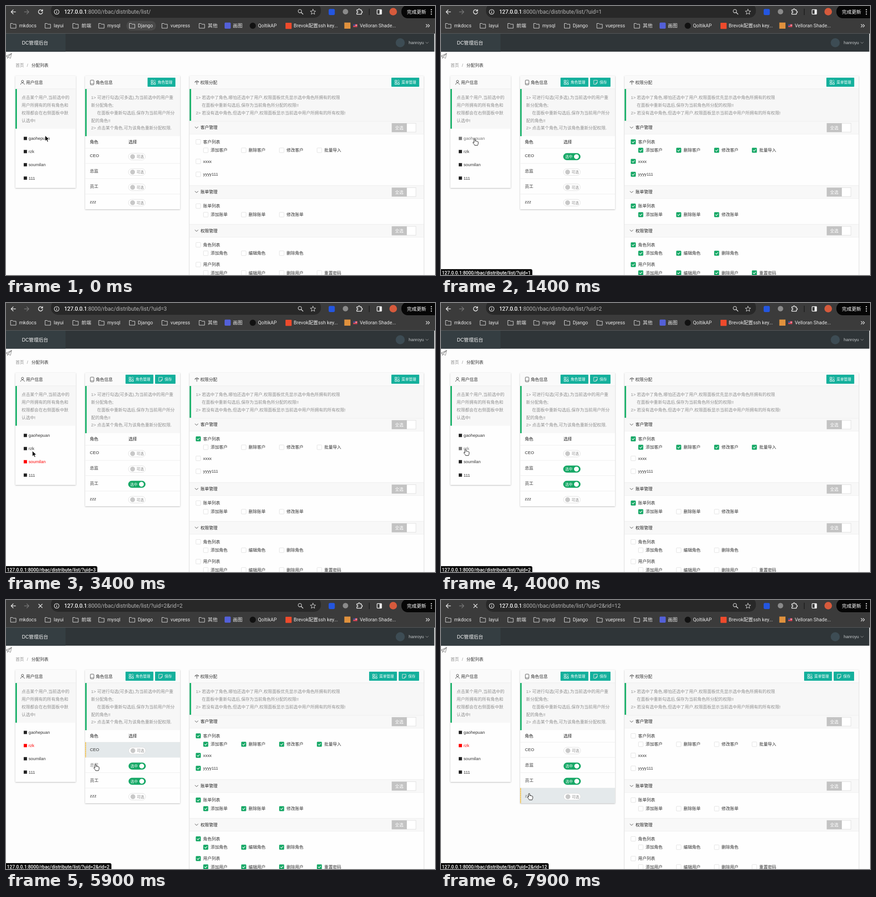
Write an HTML page that moves like this. It is 944 px wide and 593 px high and loops after 8 s.

```html
<!DOCTYPE html>
<html lang="zh-CN">
<head>
<meta charset="utf-8">
<title>分配列表</title>
<style>
html, body { margin: 0; width: 100%; height: 100%; overflow: hidden; background: #fdfdfd; }
svg { position: absolute; left: 0; top: 0; display: block; }
text { font: 9.35px "Liberation Sans", "Noto Sans CJK SC", "Noto Sans CJK", sans-serif; fill: #333; white-space: pre; }
.bar { font: 10.7px Roboto, "Noto Sans CJK SC", "Noto Sans CJK", sans-serif; fill: #e8e8e8; }
.url { font: 12.05px Roboto, sans-serif; fill: #b4b4b4; }
.host { fill: #f2f2f2; }
.brand { font-size: 10.65px; fill: #f4f4f4; }
.user { fill: #c4c8ca; }
.note { fill: #909090; }
.bold { font-weight: 500; fill: #222; }
.btn { font-size: 8.1px; font-weight: 500; fill: #fff; }
.small { font-size: 8px; fill: #858585; }
.white { fill: #fff; }
.hover { fill: #777; }
.red { fill: #f00; }
.line { fill: none; stroke: #444; stroke-width: 1; stroke-linecap: round; stroke-linejoin: round; }
.light { stroke: #e4e4e4; }
.card { fill: #fefefe; filter: drop-shadow(0 1px 1.5px #0004); }
#tint { animation: tint 8s linear infinite; }
@keyframes tint { 0% { opacity: 1; } 5%, 100% { opacity: 0; } }
#status {
  position: absolute; left: 0; top: 580px; height: 13px; padding: 0 4px 0 2px; overflow: hidden;
  background: #0b0b0b; color: #fff; border-radius: 0 4px 0 0; white-space: pre;
  font: 500 10.3px/17px Roboto, sans-serif;
}
</style>
</head>
<body>
<svg width="944" height="593" viewBox="0 0 944 593">
  <g id="fixed"></g>
  <g id="page"></g>
  <g id="cursor">
    <path id="arrow" d="M0 0V12.2L2.9 9.6L4.9 14.1L7 13.2L5 8.8H9Z" fill="#000" stroke="#fff" stroke-width=".9"/>
    <path id="hand" d="M-1.3 1.2C-1.3 -.6 1.2 -.6 1.3 1.2V5C2 4.2 3.5 4.4 3.7 5.4C4.5 4.7 5.8 5 6 6C6.8 5.5 7.9 6 7.9 7V10C7.9 12 6.7 12.6 6.6 14.2H.2C-.3 12.3-2.4 10.8-3.6 8.6C-4.2 7.4-2.9 6.6-2 7.5L-1.3 8.3Z" fill="#fff" stroke="#111" stroke-width="1"/>
  </g>
</svg>
<div id="status"></div>
<script>
const $ = id => document.getElementById(id);
const LOOP = 8000;
const HOST = '127.0.0.1', PATH = ':8000/rbac/distribute/list/';
const GREEN = '#16a866', TEAL = '#14b09c';

// Drawing helpers; text is placed by its vertical centre
const esc = s => s.replace(/&/g, '&amp;').replace(/</g, '&lt;').replace(/>/g, '&gt;');
const text = (x, y, s, cls = '', drop = 3.4) => `<text x="${x}" y="${y + drop}" class="${cls}">${esc(s)}</text>`;
const rect = (x, y, w, h, fill, more = '') => `<rect x="${x}" y="${y}" width="${w}" height="${h}" fill="${fill}" ${more}/>`;
const circle = (x, y, r, fill, more = '') => `<circle cx="${x}" cy="${y}" r="${r}" fill="${fill}" ${more}/>`;
const line = (d, cls = '', more = '') => `<path class="line ${cls}" d="${d}" ${more}/>`;
const rule = (x, y, w) => rect(x, y, w, 1, '#eee');

const users = ['gaohepuan', 'rzk', 'soumilan', '111'];
const userY = [292, 321, 350, 379.5];
const roles = ['CEO', '总监', '员工', 'zzz'];
const roleY = [330, 364, 397.5, 431.5];
const rowTop = [313.5, 347, 380.5, 414.5, 448];
const colX = [434.5, 518, 601.5, 684.5];

const sections = [
  ['客户管理', 268, [
    [299.5, '客户列表', 318, ['添加客户', '删除客户', '修改客户', '批量导入']],
    [342.5, 'xxxx', 0, []],
    [371, 'yyyy111', 0, []]]],
  ['账单管理', 410, [[441, '账单列表', 460, ['添加账单', '删除账单', '修改账单']]]],
  ['权限管理', 495.3, [
    [526.5, '角色列表', 545, ['添加角色', '编辑角色', '删除角色']],
    [570, '用户列表', 588.3, ['添加用户', '编辑用户', '删除用户', '重置密码']]]]
];

// Permission numbers follow the order of the boxes on the page
const every = [...Array(20).keys()];
const manager = [0, 1, 2, 3, 4, 7, 8];
const rolePerms = { 1: every, 2: manager, 3: [0], 12: [] };
const userRoles = { 0: [], 1: [0], 2: [1, 2], 3: [2] };
const userPerms = { 0: [], 1: every, 2: manager, 3: [0] };

function browser() {
  const folders = [[9, 29, 'mkdocs'], [85, 105, 'layui'], [146, 166, '前端'], [203, 223, 'mysql'],
    [270.5, 290, 'Django'], [342, 362, 'vuepress'], [424, 444, '其他']];
  const folder = ([x, tx, s]) =>
    line(`M${x + 1} 48.5V38.5H${x + 5.5}L${x + 7} 40.2H${x + 13}V48.5Z`, 'light') + text(tx, 43.5, s, 'bar', 3.8);
  return rect(0, 0, 944, 61, '#3b3b3b') +
    rect(99, -6, 594, 32, '#282828', 'rx="15"') +
    rect(265, 33, 65, 21, '#4a4a4a', 'rx="10" id="tint"') +
    line('M21 13H11.5M15.8 8.5L11.3 13L15.8 17.5', 'light', 'style="stroke-width:1.6"') +
    line('M40.5 13H50M45.8 8.5L50.3 13L45.8 17.5', '', 'style="stroke:#777;stroke-width:1.4"') +
    circle(111.5, 13, 5.2, 'none', 'stroke="#ddd" stroke-width="1.3"') +
    line('M111.5 12.7V15.4M111.5 10.4V10.5', 'light', 'style="stroke-width:1.4"') +
    circle(646.7, 11.3, 3.7, 'none', 'stroke="#ccc" stroke-width="1.3"') +
    line('M649.6 14.2L653.5 18', 'light', 'style="stroke-width:1.5"') +
    line('M675.5 7L677.2 11L681.4 11.3L678.2 14.1L679.2 18.2L675.5 16L671.8 18.2L672.8 14.1L669.6 11.3L673.8 11Z', 'light') +
    rect(710, 6.5, 13.5, 13.5, '#2456e0', 'rx="3"') +
    circle(747, 12.5, 6, '#8a8a8a') +
    line('M772 8.5H775.3C774.8 5.5 779.2 5.5 778.7 8.5H782V11.5C785 11 785 15.5 782 15V18.3H772V15C775 15 775 11.6 772 11.6Z', 'light', 'style="stroke-width:1.5"') +
    rect(798.7, 6, 1.2, 14, '#161616') +
    rect(816.5, 8, 10, 10, 'none', 'stroke="#eee" stroke-width="1.4" rx="1"') + rect(822, 8, 5, 10, '#eee') +
    circle(852, 12.5, 8.3, '#d65a3c') +
    rect(870, -2, 90, 29, '#060606', 'rx="14"') +
    text(882, 13, '完成更新', 'bar white', 4) +
    [8.3, 13, 17.7].map(y => circle(936, y, 1.3, '#eee')).join('') +
    folders.map(folder).join('') +
    rect(481, 36.5, 13.5, 13.5, '#5360d8', 'rx="2"') + text(499, 43.5, '画图', 'bar', 3.8) +
    circle(543, 43.5, 6.8, '#111') + text(554.5, 43.5, 'QoltikAP', 'bar', 3.8) +
    rect(615, 37, 13.5, 13.5, '#ee4a2c', 'rx="1"') + text(633, 43.5, 'Brevok配置ssh key...', 'bar', 3.8) +
    rect(744.5, 36.5, 13.5, 13.5, '#e0913d') +
    rect(764, 40, 9, 6.5, '#d9485a') + rect(764, 42, 9, 1, '#f4dede') + rect(764, 40, 4.5, 3.5, '#3a4a8c') +
    text(778.5, 43.5, 'Velloran Shade...', 'bar', 3.8) +
    line('M924.5 40.5L927.5 43.5L924.5 46.5M928.8 40.5L931.8 43.5L928.8 46.5', 'light', 'style="stroke-width:1.3"');
}

function header() {
  return rect(0, 60, 944, 1, '#5a5c5e') +
    rect(0, 61, 942.5, 39.7, '#2f3538') + rect(0, 61, 131, 39.7, '#353e42') +
    text(35, 81, 'DC管理后台', 'brand', 3.8) +
    circle(867.5, 81, 10, '#3d4c54') + text(886, 81, 'hanroyu', 'user', 3) +
    line('M923.7 79.7L926.5 82.5L929.3 79.7', '', 'style="stroke:#aaa;stroke-width:.9"') +
    line('M-1 110.5L12.5 104.5L9.8 115.5L5.2 112.6L3.3 115.8L2.8 111.6ZM2.8 111.6L12.5 104.5L5.2 112.6', '', 'style="stroke:#666;stroke-width:.8"') +
    text(21, 131, '首页', 'note') + text(46, 131, '/', 'note') + text(56, 131, '分配列表');
}

function card(x, w, h, quoteH, title, titleX) {
  return rect(x, 154, w, h, '#fefefe', 'class="card"') + rect(x, 154, w, 28.5, '#fafafa') + rule(x, 182, w) +
    rect(x, 183, w, quoteH, '#f7f7f7') + rect(x, 183, 3.3, quoteH, '#16b068') + text(titleX, 168.7, title);
}

function notes(x, lines) {
  return lines.map(([s, dx = 0], i) => text(x + dx, 201.7 + i * 16.8, s, 'note')).join('');
}

function cards() {
  return card(20.7, 132.8, 247, 87.5, '用户信息', 44) +
    circle(36.3, 166.2, 2.4, 'none', 'stroke="#444"') + line('M32.2 173C32.2 168.2 40.4 168.2 40.4 173') +
    notes(34.3, [['点击某个用户,当前选中的'], ['用户所拥有的所有角色和'], ['权限都会在右侧面板中默'], ['认选中!']]) +
    card(174.2, 208.8, 294, 104, '角色信息', 197.5) +
    rect(185.6, 163.4, 7.8, 10.4, 'none', 'stroke="#555" rx="1.5"') + line('M186 171.3H193', '', 'style="stroke-width:.7"') +
    notes(187.3, [['1> 可进行勾选(可多选),为当前选中的用户重'], ['新分配角色;'],
      ['在面板中重新勾选后,保存为当前用户所分', 13], ['配的角色!!'], ['2> 点击某个角色,可为该角色重新分配权限.']]) +
    card(404, 515, 460, 70, '权限分配', 427.5) +
    line('M415.8 168C417 163.8 423 163.8 424.3 168L421.8 166.8L420 168L418.3 166.8ZM420 167V173') +
    notes(417.7, [['1> 若选中了角色,哪怕还选中了用户,权限面板优先显示选中角色所拥有的权限'],
      ['在面板中重新勾选后,保存为当前角色所分配的权限!!', 13],
      ['2> 若没有选中角色,但选中了用户,权限面板显示当前选中用户所拥有的所有权限!']]) +
    text(184.5, 300, '角色', 'bold') + text(269.5, 300, '选择', 'bold') +
    rowTop.slice(0, 4).map(y => rule(174.5, y - .5, 208.5)).join('') +
    sections.map(([s, y]) => rect(404, y - 14.5, 515, 28.8, '#f8f8f8') + rule(404, y - 14.5, 515) + rule(404, y + 13.8, 515) +
      line(`M416 ${y - 1.6}L419.3 ${y + 1.7}L422.6 ${y - 1.6}`) + text(428, y, s, 'bold') +
      rect(849, y - 9.5, 53, 19.5, '#fff', 'stroke="#d8d8d8" stroke-width=".8"') + rect(849, y - 9.5, 33, 19.5, '#c3c3c3') +
      text(856, y + .5, '全选', 'white')).join('');
}

function button(x, label, save) {
  const icon = save
    ? line(`M${x + 8.5} 163.8H${x + 16}V169.5L${x + 13} 172.5H${x + 8.5}ZM${x + 13} 172.5V169.5H${x + 16}`, 'light')
    : [[8, 163.8], [8, 169.3], [13.8, 169.3]].map(([dx, y]) =>
        rect(x + dx, y, 3.6, 3.6, 'none', 'stroke="#fff" stroke-width=".9"')).join('') +
      line(`M${x + 15.6} 163.2L${x + 18} 165.6L${x + 15.6} 168L${x + 13.2} 165.6Z`, 'light', 'style="stroke-width:.9"');
  return rect(x, 158, save ? 45 : 61.3, 20, TEAL, 'rx="1"') + icon + text(x + (save ? 21 : 22.3), 168.3, label, 'btn', 3);
}

function toggle(x, y, on) {
  return rect(x, y - 7.2, 37.3, 14.6, on ? GREEN : '#fff', `rx="7.3" stroke="${on ? GREEN : '#d8d8d8'}" stroke-width=".8"`) +
    circle(x + (on ? 28.7 : 9.3), y + .1, 5.3, on ? '#fff' : '#c8c8c8') +
    text(x + (on ? 4 : 18), y, on ? '选中' : '可选', on ? 'small white' : 'small', 3);
}

function checkbox(x, y, on) {
  return rect(x, y - 5.1, 10.2, 10.2, on ? GREEN : '#fff', `rx="1" stroke="${on ? GREEN : '#dadada'}" stroke-width=".8"`) +
    (on ? line(`M${x + 2.6} ${y + .2}L${x + 4.5} ${y + 2.1}L${x + 7.8} ${y - 1.7}`, '', 'style="stroke:#fff;stroke-width:1.2"') : '');
}

function permissions(checked) {
  let n = 0, out = '';
  for (const [, , items] of sections)
    for (const [y, name, childY, kids] of items) {
      out += checkbox(418, y, checked.includes(n++)) + text(433.8, y, name);
      kids.forEach((kid, i) => out += checkbox(colX[i], childY, checked.includes(n++)) + text(colX[i] + 15.8, childY, kid));
    }
  return out;
}

function page({ uid, rid, hover, url, loading }) {
  const dx = rid ? .7 : 0;
  const active = rid === 12 ? 3 : rid - 1;
  return text(128, 13, HOST, 'url host', 4) +
    `<text x="128" y="17" class="url"><tspan class="host">${HOST}</tspan>${esc(PATH + url)}</text>` +
    (loading
      ? line('M72 9.2L79.6 16.8M79.6 9.2L72 16.8', 'light', 'style="stroke-width:1.6"')
      : line('M79.9 10.2A4.7 4.7 0 1 0 80.6 14M80.5 8V11.2H77.3', 'light', 'style="stroke-width:1.6"')) +
    users.map((name, i) => {
      const cls = hover === 'u' + i ? 'hover' : uid === i + 1 ? 'red' : '';
      return rect(39, userY[i] - 3.7, 7.2, 7.2, '#222', `class="${cls}"`) + text(49.7, userY[i], name, cls, 3);
    }).join('') +
    (uid ? button(263, '角色管理') + button(328, '保存', true) : button(311.5, '角色管理')) +
    (rid ? button(799, '菜单管理') + button(864, '保存', true) : button(848, '菜单管理')) +
    roles.map((name, i) =>
      (active === i
        ? rect(174.5, rowTop[i], 208.5, rowTop[i + 1] - rowTop[i], '#e4e9eb') +
          `<path d="M175.2 ${rowTop[i]}V${rowTop[i + 1]}" stroke="#f7b824" stroke-width="1.8" stroke-dasharray="2 .6"/>`
        : '') +
      text(184.5 + dx / 2, roleY[i], name, hover === 'r' + i ? 'hover' : '') +
      toggle(269.3 + dx, roleY[i] + 2, userRoles[uid].includes(i))).join('') +
    permissions(rid ? rolePerms[rid] : userPerms[uid]);
}

// Each entry changes part of the state at its time
const start = { uid: 0, rid: 0, hover: '', url: '', status: '', loading: false };
const over = (hover, status) => ({ hover, status });
const go = url => ({ url, loading: true });
const done = { loading: false };
const events = [
  [500, over('u0', '?uid=1')], [1100, go('?uid=1')], [1300, { uid: 1 }], [1400, done],
  [1600, { hover: '' }], [1700, over('u1', '?uid=2')], [2000, go('?uid=2')], [2300, { uid: 2 }], [2500, done],
  [2600, { hover: '' }], [2700, over('u2', '?uid=3')], [2900, go('?uid=3')], [3100, { uid: 3 }], [3200, done],
  [3250, { hover: '' }], [3500, over('u1', '?uid=2')], [3700, go('?uid=2')], [3900, { uid: 2 }], [4000, done],
  [4100, { hover: '' }], [4300, { status: '' }], [4500, over('r0', '?uid=2&rid=1')],
  [4900, go('?uid=2&rid=1')], [5100, { rid: 1 }], [5200, done],
  [5350, { hover: '' }], [5500, over('r1', '?uid=2&rid=2')], [5800, go('?uid=2&rid=2')], [6000, { rid: 2 }], [6100, done],
  [6120, { hover: '' }], [6230, over('r2', '?uid=2&rid=3')], [6600, go('?uid=2&rid=3')], [6800, { rid: 3 }], [7000, done],
  [7200, { hover: '' }], [7320, over('r3', '?uid=2&rid=12')], [7600, go('?uid=2&rid=12')], [7800, { rid: 12 }]
];

// Pointer moves: start time, end time, end point
const moves = [
  [300, 750, 74, 293], [1400, 1850, 54, 321], [2500, 2750, 66, 350], [3150, 3380, 58, 326],
  [3430, 3580, 54, 322], [4000, 4600, 197.5, 325], [5250, 5600, 197, 362], [6050, 6260, 196, 396], [7100, 7420, 194, 426.5]
];

function pointer(t) {
  let x = 86, y = 285.5;
  for (const [from, to, nx, ny] of moves) {
    if (t <= from) break;
    const p = Math.min(1, (t - from) / (to - from)), k = p * p * (3 - 2 * p);
    x += (nx - x) * k;
    y += (ny - y) * k;
  }
  return [x, y];
}

let shown = -1;
function draw(t) {
  const past = events.filter(([at]) => at <= t);
  if (past.length !== shown) {
    shown = past.length;
    const state = Object.assign({}, start, ...past.map(e => e[1]));
    $('page').innerHTML = page(state);
    $('status').textContent = HOST + PATH + state.status;
    $('status').style.display = state.status ? '' : 'none';
    $('hand').style.display = state.hover ? '' : 'none';
    $('arrow').style.display = state.hover ? 'none' : '';
  }
  $('cursor').setAttribute('transform', `translate(${pointer(t)})`);
}

$('fixed').innerHTML = browser() + header() + cards();
const begin = performance.now();
(function tick() {
  draw((performance.now() - begin) % LOOP);
  requestAnimationFrame(tick);
})();
</script>
</body>
</html>
```
